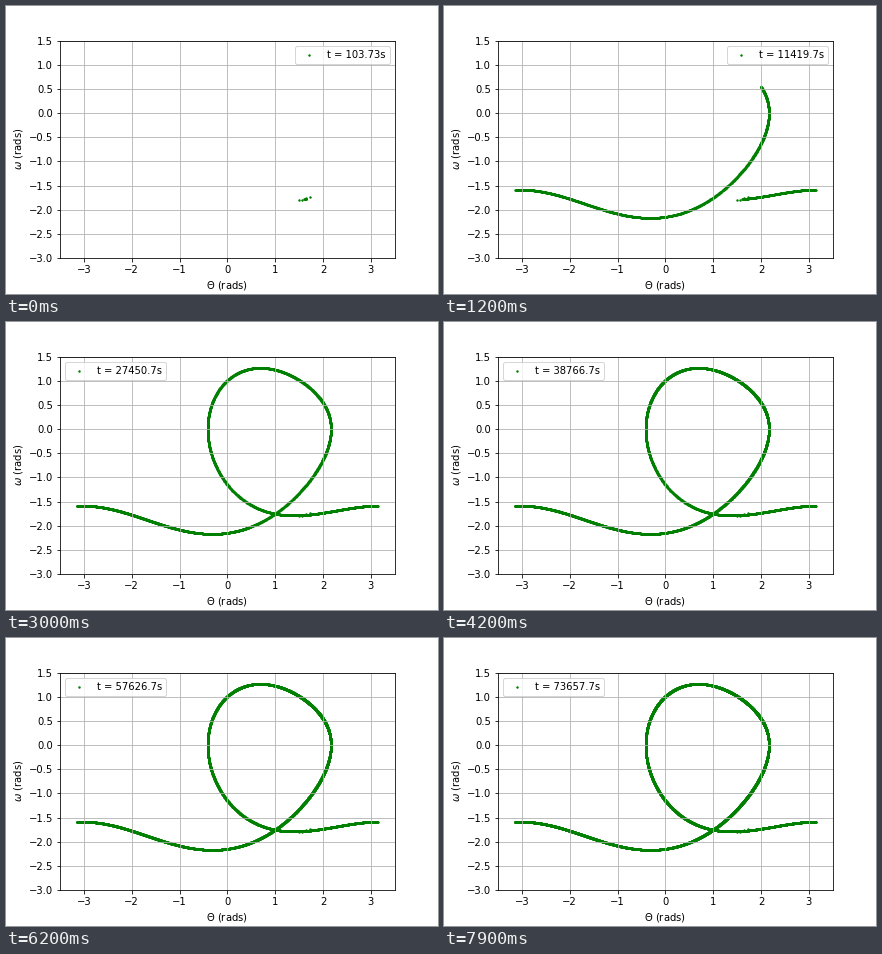
Animation of 432x288 px, one loop 8 s. Source, as a matplotlib script:

```python
import math

import matplotlib.pyplot as plt
import numpy as np
from matplotlib.animation import FuncAnimation

# Damped driven pendulum, strobed slightly faster than its drive period
DAMPING, FORCE, DRIVE = 0.5, 1.4, 0.666
PERIOD = 2 * math.pi / DRIVE
STROBE = 9.43
SUBSTEPS = 200
SETTLE = 120

FRAMES = 80
FIRST = 11
PER_FRAME = 100
HOLD = 14  # the count pauses for one tick here


def accel(t, th, om):
    return FORCE * math.sin(DRIVE * t) - math.sin(th) - DAMPING * om


def integrate(th, om):
    """RK4 path from the first strobe until the motion is periodic."""
    h = STROBE / SUBSTEPS
    path = [(STROBE, th, om)]
    for i in range(SETTLE * SUBSTEPS):
        t = STROBE + i * h
        a1 = accel(t, th, om)
        o2 = om + h / 2 * a1
        a2 = accel(t + h / 2, th + h / 2 * om, o2)
        o3 = om + h / 2 * a2
        a3 = accel(t + h / 2, th + h / 2 * o2, o3)
        o4 = om + h * a3
        a4 = accel(t + h, th + h * o3, o4)
        th += h / 6 * (om + 2 * o2 + 2 * o3 + o4)
        om += h / 6 * (a1 + 2 * a2 + 2 * a3 + a4)
        path.append((t + h, th, om))
    return np.array(path).T


def strobe_points(total):
    t, th, om = integrate(1.73, -1.742)
    when = STROBE * np.arange(1, total + 1)
    start = t[-1] - PERIOD
    when = np.where(when > start, start + (when - start) % PERIOD, when)
    angle = (np.interp(when, t, th) + np.pi) % (2 * np.pi) - np.pi
    return np.column_stack([angle, np.interp(when, t, om)])


def count_at(i):
    return FIRST + PER_FRAME * (i if i < HOLD else i - 1)


points = strobe_points(count_at(FRAMES - 1))

fig, ax = plt.subplots(figsize=(6, 4), dpi=72)
fig.subplots_adjust(left=0.125, right=0.9, bottom=0.125, top=0.88)
ax.set_xlim(-3.5, 3.5)
ax.set_ylim(-3, 1.5)
ax.set_xlabel(r"$\Theta$ (rads)")
ax.set_ylabel(r"$\omega$ (rads)")
ax.grid(True)
dots = ax.scatter([], [], s=2, color="green")


def update(i):
    n = count_at(i)
    dots.set_offsets(points[:n])
    dots.set_label(f"t = {n * STROBE:g}s")
    ax.legend(loc="best")
    return [dots]


anim = FuncAnimation(fig, update, frames=FRAMES, init_func=lambda: [dots],
                     interval=100, repeat=True, repeat_delay=0, blit=False)
plt.show()
```
